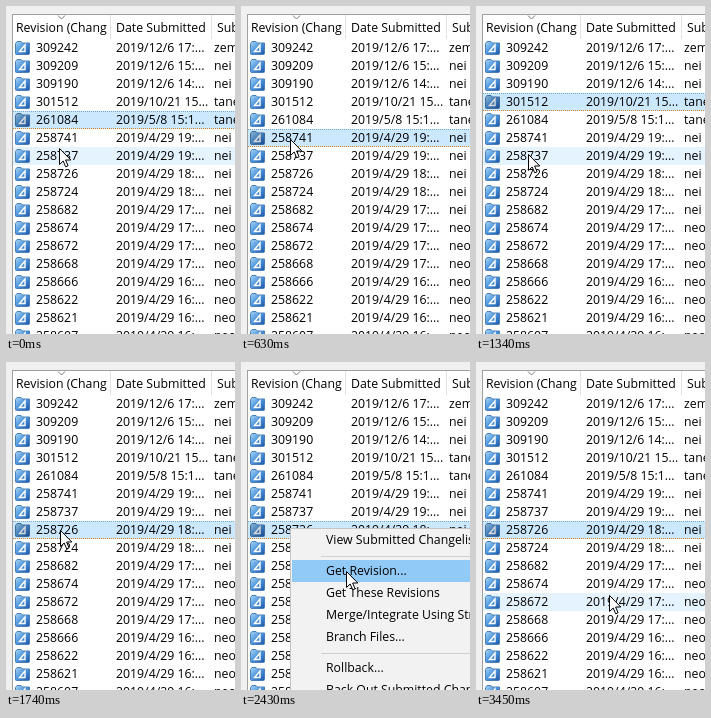
An HTML page for the animation above (4.84 s loop, 229x328 px).

```html
<!DOCTYPE html>
<html lang="en">
<head>
<meta charset="utf-8">
<title>Revision list</title>
<style>
html, body { margin: 0; width: 100%; height: 100%; overflow: hidden; background: #f0f0f0; }
#stage {
  position: relative; width: 229px; height: 328px; overflow: hidden;
  font: 12.3px "Open Sans", "Noto Sans", sans-serif; color: #000; white-space: nowrap;
}
#stage * { position: absolute; box-sizing: border-box; }
#list { left: 6px; top: 8px; width: 230px; height: 330px; background: #fff; border: solid #a0a0a0; border-width: 1px 0 0 1px; }
.head { top: 13px; line-height: 18px; }
.sep { top: 9px; width: 1px; height: 24px; background: #e2e2e2; }
.row { left: 7px; width: 222px; height: 18px; line-height: 17px; }
.row.hover { background: #e5f3ff; }
.row.sel { background: #cce8ff; }
.row.sel::before, .row.sel::after {
  content: ""; position: absolute; left: 0; width: 100%; height: 1px;
  background: repeating-linear-gradient(90deg, var(--dot) 0 1px, transparent 1px 2px);
}
.row.sel::before { top: 0; --dot: #6fa9d4; }
.row.sel::after { bottom: 0; --dot: #d9822b; }
.row svg { left: 2px; top: 1px; }
.row.sel svg { filter: brightness(.85); }
.id { left: 23px; }
.date { left: 103px; }
.user { left: 201px; }
#menu {
  left: 49px; top: 166px; width: 240px; height: 200px;
  background: #f2f2f2; border: 1px solid #c4c4c4;
}
.item { left: 1px; width: 236px; height: 22px; padding-left: 34px; line-height: 21px; }
.item.hover { background: #91c9f7; }
.rule { left: 30px; width: 210px; height: 1px; background: #d0d0d0; }
#ring { width: 24px; height: 24px; border-radius: 50%; background: rgba(255, 228, 40, .55); }
</style>
</head>
<body>
<div id="stage">
  <svg width="0" height="0">
    <defs>
      <linearGradient id="blue" x1="0" y1="0" x2="1" y2="1">
        <stop offset="0" stop-color="#a9d6f7"/>
        <stop offset=".5" stop-color="#4b94dc"/>
        <stop offset="1" stop-color="#1c55a8"/>
      </linearGradient>
      <g id="icon">
        <path d="M.5 3.5 2 1.5H6L7.5 3H14.5V13.5Q14.5 14.5 13.5 14.5H1.5Q.5 14.5 .5 13.5Z" fill="url(#blue)" stroke="#4a7fb8"/>
        <path d="M4.5 11.5 10 5V11.5Z" fill="none" stroke="#fff" stroke-width="1.4"/>
      </g>
    </defs>
  </svg>
  <div id="list"></div>
  <div class="sep" style="left:104px"></div>
  <div class="sep" style="left:205px"></div>
  <svg style="left:51px;top:9px" width="9" height="5"><path d="M1 .5 4.5 4 8 .5" fill="none" stroke="#777"/></svg>
  <span class="head" style="left:10px">Revision (Chang</span>
  <span class="head" style="left:110px">Date Submitted</span>
  <span class="head" style="left:211px">Submitted By</span>
  <div id="rows"></div>
  <div id="menu"></div>
  <div id="ring"></div>
  <svg id="cursor" width="14" height="21">
    <path d="M.5 .5V16.5L4.2 13 6.7 18.8 9.1 17.8 6.6 12H11.8Z" fill="#fff" stroke="#000"/>
  </svg>
</div>
<script>
const LOOP = 4840, TOP = 33, ROW = 18;
const $ = id => document.getElementById(id);

const entries = `309242 2019/12/6 17:... zemin
309209 2019/12/6 15:... nei
309190 2019/12/6 14:... nei
301512 2019/10/21 15... tanev
261084 2019/5/8 15:1... tanev
258741 2019/4/29 19:... nei
258737 2019/4/29 19:... nei
258726 2019/4/29 18:... nei
258724 2019/4/29 18:... nei
258682 2019/4/29 17:... nei
258674 2019/4/29 17:... neo
258672 2019/4/29 17:... neo
258668 2019/4/29 17:... neo
258666 2019/4/29 16:... neo
258622 2019/4/29 16:... neo
258621 2019/4/29 16:... neo
258607 2019/4/29 16:... neo`.split("\n");

const rows = entries.map((line, i) => {
  const [, id, date, user] = line.match(/^(\S+) (.+) (\S+)$/);
  const el = document.createElement("div");
  el.className = "row";
  el.style.top = TOP + i * ROW + "px";
  el.innerHTML = `<svg width="16" height="16"><use href="#icon"/></svg>
    <span class="id">${id}</span><span class="date">${date}</span><span class="user">${user}</span>`;
  $("rows").append(el);
  return el;
});

// Stage y of each menu entry
const items = [
  [167, "View Submitted Changelist"],
  [198, "Get Revision..."],
  [220, "Get These Revisions"],
  [242, "Merge/Integrate Using Stream..."],
  [264, "Branch Files..."],
  [295, "Rollback..."],
  [317, "Back Out Submitted Changelist"]
].map(([y, text]) => {
  const el = document.createElement("div");
  el.className = "item";
  el.style.top = y - 167 + "px";
  el.textContent = text;
  $("menu").append(el);
  return { y, el };
});
for (const y of [194, 291]) {
  const el = document.createElement("div");
  el.className = "rule";
  el.style.top = y - 167 + "px";
  $("menu").append(el);
}

// Pointer steps: time, x, y, pressed
const steps = [
  [0, 53, 142], [70, 52, 140], [150, 51, 139],
  [320, 51, 144], [400, 50, 138], [480, 49, 133], [560, 49, 133, 1], [630, 49, 133], [720, 49, 129],
  [870, 49, 116], [960, 49, 103], [1110, 49, 103, 1], [1190, 49, 103],
  [1270, 50, 120], [1340, 52, 148], [1420, 54, 169], [1570, 54, 169, 1], [1650, 54, 169], [1740, 54, 168],
  [2190, 60, 176], [2270, 78, 190], [2350, 94, 201], [2430, 105, 209], [2510, 120, 223], [2580, 133, 245],
  [2750, 133, 239], [2820, 133, 233], [3300, 133, 233, 1], [3450, 133, 233]
];
const picks = [[0, 4], [560, 5], [1110, 3], [1570, 7]];
const at = (list, t) => list.findLast(s => s[0] <= t);

function place(el, x, y) {
  el.style.transform = `translate(${x}px, ${y}px)`;
}

function draw(t) {
  const [, x, y, pressed] = at(steps, t);
  const selected = at(picks, t)[1];
  const open = t >= 2120 && t < 3450;
  const over = open ? -1 : Math.floor((y - TOP) / ROW);
  rows.forEach((el, i) => {
    el.classList.toggle("sel", i === selected);
    el.classList.toggle("hover", i === over);
  });
  for (const { y: top, el } of items) el.classList.toggle("hover", y >= top && y < top + 22);
  $("menu").style.display = open ? "block" : "none";
  $("ring").style.display = pressed ? "block" : "none";
  place($("ring"), x - 13, y - 13);
  place($("cursor"), x, y);
}

// Anchor overlays at the stage corner so transforms are absolute
for (const id of ["ring", "cursor"]) $(id).style.left = $(id).style.top = 0;

const start = performance.now();
function tick() {
  draw((performance.now() - start) % LOOP);
  requestAnimationFrame(tick);
}
tick();
</script>
</body>
</html>
```
